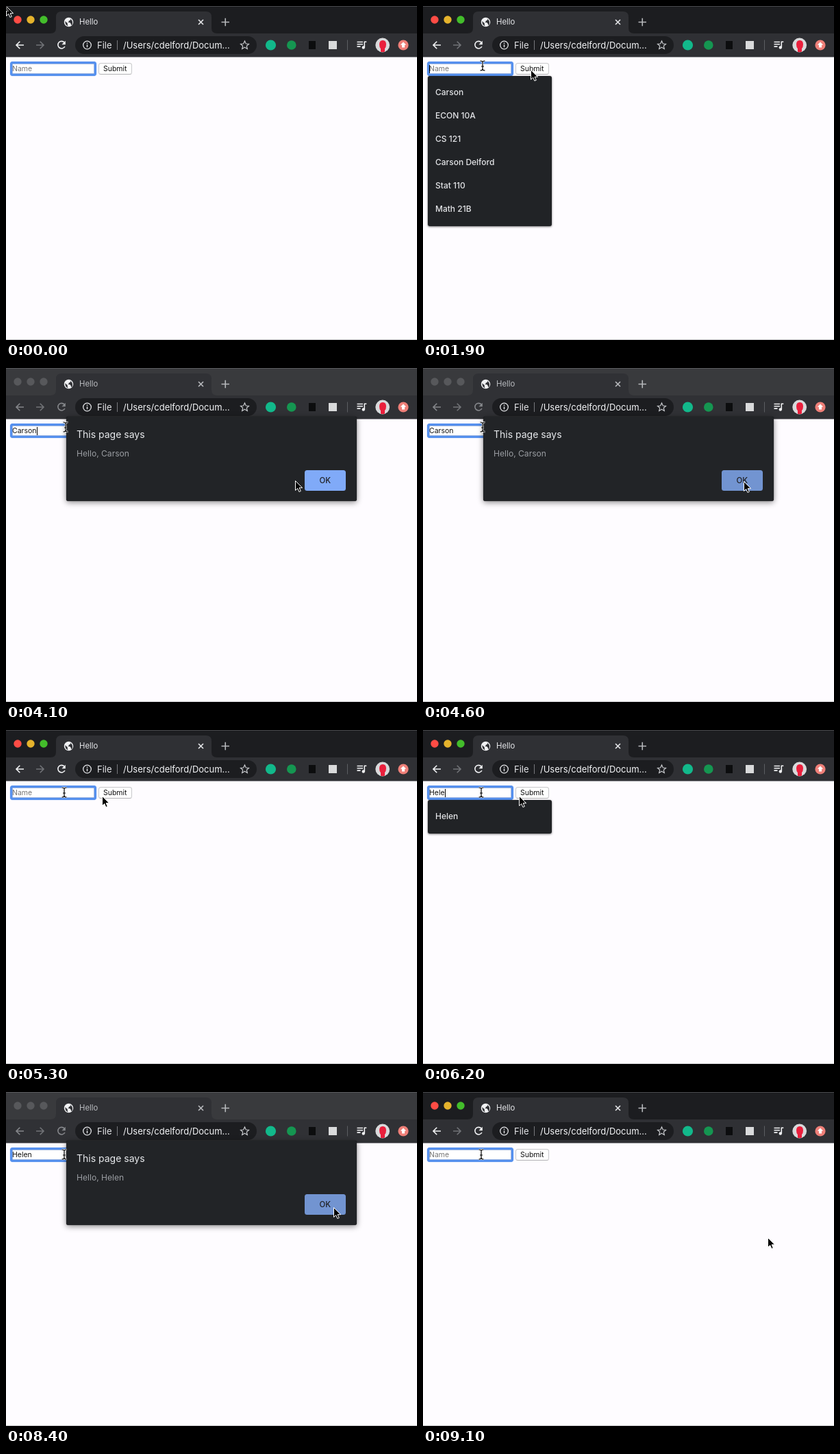
Recreate the animation shown at these times as an HTML page. Size 600 by 487 pixels, loop 9200 ms.

```html
<!DOCTYPE html>
<html lang="en">
<head>
<meta charset="utf-8">
<title>Hello</title>
<style>
  html, body { margin: 0; width: 100%; height: 100%; overflow: hidden; background: #fefcff; }
  body { position: relative; font: 10.5px Inter, sans-serif; }
  #stage { position: absolute; left: 0; top: 0; width: 600px; height: 487px; overflow: hidden; }
  #stage div, #stage svg { position: absolute; box-sizing: border-box; white-space: pre; }
  [hidden] { display: none !important; }

  #chrome { left: 0; top: 0; --strip: #1c1d20; --bar: #2f3034; --ink: #f1f2f4; --title: #e6e7ea; --edge: #47484a; }
  #chrome.idle { --strip: #393a3d; --bar: #303135; --ink: #85878b; --title: #b9bbbf; --edge: #58595c; }
  #chrome.grey .light { fill: #57585b; }
  .line { fill: none; stroke-width: 1.6; }

  #field { left: 5.5px; top: 81px; width: 126px; height: 21px; border: 3px solid #5590ee; border-radius: 4px;
    background: #fff; box-shadow: 0 0 1px #5590ee, inset 0 0 0 .5px #3f6fc4; }
  #typed { left: 9px; top: 84px; height: 15px; line-height: 15.5px; color: #111; }
  #typed.empty { color: #757575; }
  #caret { top: 85.5px; width: 1px; height: 12px; background: #000; }
  #submit { left: 134.5px; top: 83px; width: 49.5px; height: 17px; border: 1px solid #c9c9cb; border-bottom-color: #b2b2b4;
    border-radius: 3.5px; background: #fff; color: #111; text-align: center; line-height: 15.5px; }

  #list { left: 7px; top: 101.5px; width: 181px; padding: 7.5px 0 7.5px 11px; border-radius: 3px; background: #212326;
    color: #e4e5e8; font-size: 12px; font-weight: 500; line-height: 34px; box-shadow: 0 1px 3px #0008; }

  #clip { left: 0; top: 0; width: 600px; height: 487px; }
  #dialog { left: 87.5px; top: 70.5px; width: 424px; height: 123.5px; border-radius: 3px; background: #222427;
    box-shadow: 0 2px 9px #0007, 0 0 1px #000; transform-origin: 50% 100%; }
  #dialog .head { left: 15.5px; top: 17px; line-height: 18px; font-size: 14px; color: #e8eaed; }
  #greeting { left: 15.5px; top: 46px; line-height: 16px; font-size: 12.1px; color: #9a9da2; }
  #ok { left: 348px; top: 78px; width: 60.5px; height: 30px; border-radius: 3.5px; background: #80aaf8;
    color: #202124; font-size: 11.4px; font-weight: 500; text-align: center; line-height: 30px; }
  #ok.hover { background: #7294d1; }
  #foot { left: 0; top: 485.5px; width: 600px; height: 1px; background: #c4c3c6; }
  #arrow, #beam { left: 0; top: 0; overflow: visible; }
</style>
</head>
<body>
<div id="stage">
  <svg id="chrome" width="600" height="75" viewBox="0 0 600 75" font-family="Inter, sans-serif">
    <path fill="var(--strip)" d="M0 0h600v41H0z"/>
    <path fill="var(--edge)" d="M0 0h600v1H0z"/>
    <path fill="var(--bar)" d="M0 40h65q8 0 8-8V16q0-8 8-8h211q8 0 8 8v16q0 8 8 8h292v34.5H0z"/>
    <circle class="light" cx="17" cy="20" r="5.7" fill="#fe4c45"/>
    <circle class="light" cx="36" cy="20" r="5.7" fill="#e5b32c"/>
    <circle class="light" cx="55" cy="20" r="5.7" fill="#43bd2b"/>

    <circle cx="91.5" cy="23.5" r="6.7" fill="#f1f2f4"/>
    <path fill="var(--bar)" d="M86.4 22l3.4 3.3v2.8l1.3 1.2q-5-1-4.7-7.3zM92.2 18.3l1.9.6-.4 2-2 .6v1.6l-1.9.3 3.5.9 1.6 1.6.1 2.3 1.6-1.3q1.4-4.6-1.5-7.2z"/>
    <text x="107" y="27.4" font-size="11.3" fill="var(--title)">Hello</text>
    <path class="line" stroke="var(--title)" d="M281 20l7 7m0-7l-7 7"/>
    <path class="line" stroke="#b6b8bb" d="M314.5 23.5h11.5m-5.75-5.75v11.5"/>

    <path class="line" stroke="var(--ink)" d="M26 57H15m5.3-5.3L15 57l5.3 5.3"/>
    <path class="line" stroke="#717377" d="M44 57h11m-5.3-5.3L55 57l-5.3 5.3"/>
    <path class="line" stroke="var(--ink)" d="M85.2 53.2a5.3 5.3 0 1 0 .7 5.8"/>
    <path fill="var(--ink)" d="M86.8 50.8v5.4h-5.4z"/>

    <rect x="101" y="44" width="265" height="26" rx="13" fill="#1c1d20"/>
    <circle class="line" cx="118.5" cy="57" r="5.8" style="stroke-width:1.3" stroke="#e4e5e8"/>
    <path class="line" style="stroke-width:1.4" stroke="#e4e5e8" d="M118.5 56.2v4m0-6.8v1.5"/>
    <text x="133" y="61.7" font-size="13" fill="#e4e5e8">File</text>
    <path fill="#77797d" d="M162 50h1v14h-1z"/>
    <text x="171" y="61.7" font-size="13" fill="#f3f4f6">/Users/cdelford/Docum...</text>
    <path class="line" style="stroke-width:1.2" stroke="#c6c8cb" d="M348.5 51l1.8 4 4.2.4-3.2 2.9 1 4.2-3.8-2.2-3.8 2.2 1-4.2-3.2-2.9 4.2-.4z"/>

    <circle cx="386.5" cy="57" r="7.6" fill="#12b98b"/>
    <circle cx="416.8" cy="57" r="6.8" fill="#159651"/>
    <path fill="#0c0d0e" d="M442 51h10v12h-10z"/>
    <path fill="#d9dadb" d="M471 51h12v12h-12z"/>
    <path fill="#5c5e62" d="M498 49.5h1v15h-1z"/>
    <path class="line" stroke="#f1f2f4" d="M512.5 52.5h8.5m-8.5 3.3h8.5m-8.5 3.3h5m5.8 1.5v-8.3h3"/>
    <circle cx="521.8" cy="60.5" r="2.2" fill="#f1f2f4"/>
    <circle cx="549.7" cy="57" r="10.4" fill="#d9d9db"/>
    <path fill="#ea1f3c" d="M545 56q0-6 5-6t5 6q0 4-2 6v4.6q-3 1.2-6 .2v-4.6q-2-2-2-6.2z"/>
    <circle cx="580" cy="57" r="7.6" fill="#ee7f78"/>
    <path fill="#fff" d="M580 52.5l4.2 4.3H582v3.7h-4v-3.7h-2.2z"/>
  </svg>

  <div id="field"></div>
  <div id="typed"></div>
  <div id="caret"></div>
  <div id="submit">Submit</div>
  <div id="list"></div>
  <div id="foot"></div>
  <div id="clip">
    <div id="dialog">
      <div class="head">This page says</div>
      <div id="greeting"></div>
      <div id="ok">OK</div>
    </div>
  </div>
  <svg id="arrow" width="12" height="18">
    <path fill="#000" stroke="#fff" d="M.5.5v14l3.2-3 2.2 5 2.4-1-2.2-4.8h4.5z"/>
  </svg>
  <svg id="beam" width="10" height="16" fill="none">
    <path id="halo" stroke="#fff" stroke-width="2.6" d="M-3.5-7q3.5 0 3.5 2V5q0 2-3.5 2M3.5-7Q0-7 0-5V5q0 2 3.5 2M-2 1h4"/>
    <path stroke="#000" stroke-width="1.2" d="M-3.5-7q3.5 0 3.5 2V5q0 2-3.5 2M3.5-7Q0-7 0-5V5q0 2 3.5 2M-2 1h4"/>
  </svg>
</div>
<script>
const LOOP = 9200, STEP = 100;
const $ = id => document.getElementById(id);
const within = (t, from, to) => t >= from && t < to;

const courses = ['Carson', 'ECON 10A', 'CS 121', 'Carson Delford', 'Stat 110', 'Math 21B'];
const lists = [
  [1300, 2200, courses],
  [2200, 2500, ['Carson', 'CS 121', 'Carson Delford']],
  [2500, 3100, ['Carson', 'Carson Delford']],
  [5600, 5900, ['Helen', 'Hist 12A']],
  [5900, 6400, ['Helen']]
];

const rounds = [
  { name: 'Carson', keys: [2200, 2500, 2600, 2700, 2800, 2900], grey: 3100, open: 3300, tilt: [.5], close: 4700 },
  { name: 'Helen', keys: [5600, 5900, 6100, 6200, 6400], grey: 6900, open: 6900, tilt: [1, .3], close: 8600 }
];

const caretOn = [[1000, 1500], [1900, 3800], [4100, 4500], [5600, 6900], [7700, 8200]];

// Each pointer path: time, x, y
const paths = [
  [[100, 412, 188], [200, 345, 118], [300, 284, 63], [400, 284, 63], [600, 235, 76],
   [900, 118, 101], [1100, 87, 89], [1800, 87, 89], [1900, 87, 87], [2000, 87, 86], [2100]],
  [[3800, 140, 112], [3900, 260, 146], [4100, 422, 164], [4300, 466, 167], [4600, 468, 165],
   [4700, 446, 152], [4800, 390, 132], [5100, 140, 96], [5300, 85, 91], [5600]],
  [[7300, 87, 99], [7400, 180, 138], [7500, 278, 162], [7600, 278, 162], [7900, 390, 166],
   [8200, 470, 167], [8400, 478, 168], [8500, 480, 168], [8600, 520, 184], [8700, 516, 193],
   [9100, 503, 212], [9200]]
];

function pointer(t) {
  const path = paths.find(p => within(t, p[0][0], p.at(-1)[0]));
  if (!path) return null;
  const i = path.findLastIndex(k => k[0] <= t);
  const [t0, x0, y0] = path[i];
  const [t1, x1 = x0, y1 = y0] = path[i + 1];
  const u = (t - t0) / (t1 - t0);
  return { x: x0 + (x1 - x0) * u, y: y0 + (y1 - y0) * u };
}

function showDialog(round, t) {
  const open = !!round && within(t, round.open, round.close);
  $('clip').hidden = !open;
  if (!open) return false;
  const q = round.tilt[(t - round.open) / STEP] || 0;
  $('clip').style.clipPath = q ? 'inset(74.5px 0 0 0)' : 'none';
  $('dialog').style.opacity = 1 - .63 * q;
  $('dialog').style.transform = q
    ? `translateY(${-13 * q}px) matrix3d(1,0,0,0, 0,${1 + .05 * q},0,${-.0004 * q}, 0,0,1,0, 0,0,0,1)`
    : 'none';
  $('greeting').textContent = 'Hello, ' + round.name;
  return true;
}

function showPointer(p, modal) {
  const inBox = (x0, y0, x1, y1) => p.x > x0 && p.x < x1 && p.y > y0 && p.y < y1;
  const overText = !!p && !modal && (inBox(6, 82, 131, 102) || inBox(101, 44, 366, 70));
  $('beam').hidden = !overText;
  $('arrow').hidden = !p || overText;
  $('ok').classList.toggle('hover', !!p && modal && inBox(435, 148, 496, 179));
  if (p) $(overText ? 'beam' : 'arrow').style.transform = `translate(${p.x}px, ${p.y}px)`;
}

function render(t) {
  const round = rounds.find(r => within(t, r.keys[0], r.close + STEP));
  const text = round ? round.name.slice(0, round.keys.filter(k => k <= t).length) : '';
  $('typed').textContent = text || 'Name';
  $('typed').className = text ? '' : 'empty';
  $('caret').hidden = !caretOn.some(([from, to]) => within(t, from, to));
  $('caret').style.left = 9 + (text ? $('typed').getBoundingClientRect().width : 0) + 'px';

  const list = lists.find(([from, to]) => within(t, from, to));
  $('list').hidden = !list;
  if (list) $('list').textContent = list[2].join('\n');

  $('chrome').classList.toggle('grey', !!round && within(t, round.grey, round.close));
  $('chrome').classList.toggle('idle', !!round && within(t, round.open, round.close + STEP));
  showPointer(pointer(t), showDialog(round, t));
}

const start = performance.now();
function tick(now) {
  const t = Math.max(0, now - start) % LOOP;
  render(Math.floor(t / STEP) * STEP);
  requestAnimationFrame(tick);
}
render(0);
requestAnimationFrame(tick);
</script>
</body>
</html>
```
